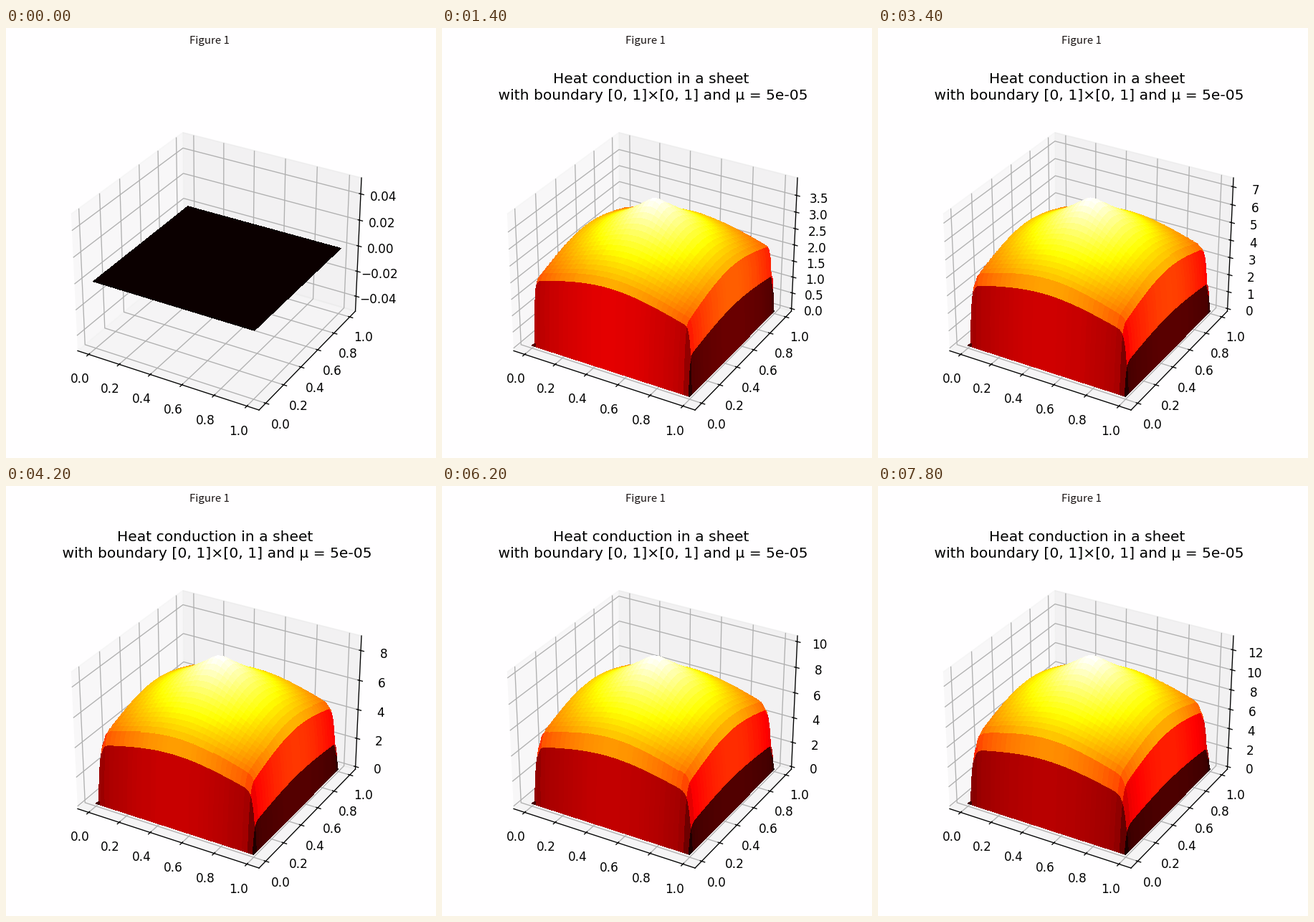
A matplotlib script for the animation above (8000 ms loop, 600 by 600 pixels).

```python
import numpy as np
import matplotlib.pyplot as plt
from matplotlib.animation import FuncAnimation
from matplotlib.ticker import MaxNLocator

SIZE, DPI = 600, 120
FRAMES, INTERVAL = 40, 200
BACK = "#fffeff"
MARGIN = 1 / 48

# heat equation on the unit square, explicit scheme, cold boundary
N = 101
MU = 5e-5
DX = 1 / (N - 1)
DT = DX**2 / (4 * MU)
X, Y = np.meshgrid(np.linspace(0, 1, N), np.linspace(0, 1, N))
SOURCE = np.exp(-np.hypot(X - 0.5, Y - 0.5))

# the solver advances at an uneven pace: seconds -> steps done
PACE_T = [0, 0.4, 1.4, 2.6, 4.2, 4.4, 5.2, 6.2, 7.8]
PACE_N = [0, 2, 8, 13, 18, 19, 20, 21, 27]


def solve(steps):
    u = np.zeros((N, N))
    states = [u]
    for _ in range(steps):
        lap = (u[2:, 1:-1] + u[:-2, 1:-1] + u[1:-1, 2:] + u[1:-1, :-2]
               - 4 * u[1:-1, 1:-1])
        new = np.zeros_like(u)
        new[1:-1, 1:-1] = (u[1:-1, 1:-1] + MU * DT / DX**2 * lap
                           + DT * SOURCE[1:-1, 1:-1])
        u = new
        states.append(u)
    return states


def padded(lo, hi):
    pad = (hi - lo) * MARGIN
    return lo - pad, hi + pad


STATES = solve(PACE_N[-1])

plt.rcParams.update({"font.family": "DejaVu Sans", "font.size": 10.15})
fig = plt.figure(figsize=(SIZE / DPI, SIZE / DPI), dpi=DPI, facecolor=BACK)
side = 450.5 / SIZE
ax = fig.add_axes([66 / SIZE, 1 - 561.5 / SIZE, side, side], projection="3d")
fig.text(283.7 / SIZE, 1 - 22 / SIZE, "Figure 1", ha="center", va="baseline",
         family="Noto Sans CJK JP", size=9, color="#1a1414")


def update(i):
    t = i * INTERVAL / 1000
    u = STATES[int(np.interp(t, PACE_T, PACE_N) + 1e-6)]
    lo, hi = (0, u.max()) if u.any() else (-0.05, 0.05)

    ax.clear()
    ax.set_facecolor("none")
    ax.plot_surface(X, Y, u, cmap="hot", linewidth=0, antialiased=False)
    ax.set_xlim(*padded(-0.05, 1.05))
    ax.set_ylim(*padded(-0.05, 1.05))
    for axis in "xy":
        ax.tick_params(axis=axis, pad=3.15)
    ticks = MaxNLocator(8, steps=[1, 2, 2.5, 5, 10]).tick_values(lo, hi)
    ax.set_zticks([z for z in ticks if lo * 0.99 <= z <= hi * 0.99])
    ax.set_zlim(*padded(lo, hi))
    if i > 0:
        ax.set_title("Heat conduction in a sheet\n"
                     " with boundary [0, 1]×[0, 1] and µ = 5e-05",
                     pad=6.66, linespacing=1.27)
    return []


anim = FuncAnimation(fig, update, frames=FRAMES, interval=INTERVAL,
                     init_func=lambda: [], repeat=True, repeat_delay=0,
                     blit=False)
plt.show()
```
